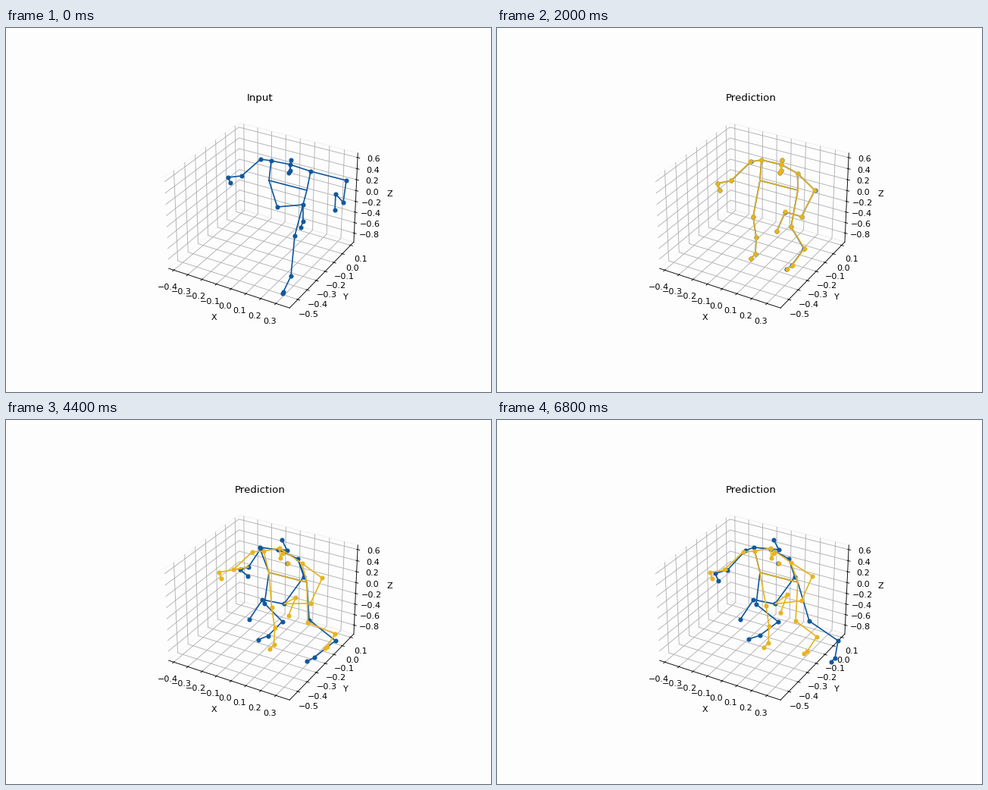
Animation, 640 px wide and 480 px high, one loop 7000 ms. Source, as a matplotlib script:

```python
import numpy as np
import matplotlib.pyplot as plt
from matplotlib.animation import FuncAnimation

W, H, DPI = 640, 480, 80
FRAMES, STEP_MS = 35, 200
SWITCH, LAST_SEEN = 7, 10
BLUE, YELLOW, PAPER = "#0f579d", "#e7b41d", "#fdfdfd"
HIP_A, HIP_B = (347, 201), (397, 214)

# Opening pose in stage pixels, every limb from root to tip
START = {
    "arm_a": [(350, 175), (336, 173), (311, 195), (293, 197), (296, 204)],
    "arm_b": [(402, 189), (449, 201), (445, 230), (435, 219), (434, 240)],
    "head": [(375, 180), (375, 188), (376, 174), (373, 191)],
    "leg_a": [(358, 236), (392, 233), (392, 255), (389, 263)],
    "leg_b": [(381, 274), (376, 327), (366, 348), (365, 350)],
}
START = {name: np.array(points, float) for name, points in START.items()}


def span(t, a, b):
    return min(max((t - a) / (b - a), 0), 1)


def step(t, a, b):
    """Ease from 0 at a to 1 at b."""
    u = span(t, a, b)
    return u * u * (3 - 2 * u)


def settle(t, a, b):
    """Start fast at a and come to rest at b."""
    return np.sin(np.pi / 2 * span(t, a, b))


def hump(t, a, b):
    """Rise and fall between a and b."""
    return np.sin(np.pi * span(t, a, b)) ** 2


def ramp(root, tip, n=5, power=0.65):
    """Offsets along a limb, going over from root to tip."""
    w = np.linspace(0, 1, n)[:, None] ** power
    return np.array(root) * (1 - w) + np.array(tip) * w


def shift(*offsets):
    return np.array(offsets, float)


def truth(t):
    """The recorded motion: a stride, then a turn of the upper body."""
    bob = shift((4, 2)) * hump(t, 0, 6)
    sway = hump(t, 12, 24)
    turn = step(t, 10, 18)
    swing = span(t, 10, 34) ** np.array([[1], [0.6], [1.7], [2]])
    moves = {
        "arm_a": bob
        + ramp((-1, -1), (-2, 10)) * step(t, 3, 10)
        + ramp((-10, -6), (-2, -2)) * turn
        + ramp((-6, 0), (36, -8)) * hump(t, 10, 28),
        "arm_b": ramp((-5, 3), (-63, 28)) * settle(t, 0, 10)
        + ramp((-12, -9), (-50, -5)) * step(t, 9, 18),
        "head": bob
        + shift((-14, -10), (-3, -17), (-11, -16), (-2, -2)) * turn
        + ramp((-8, 4), (-2, 0), 4) * sway,
        "leg_a": ramp((-7, 0), (13, -17), 4) * hump(t, 0, 6)
        + shift((-20, 13), (-50, 43), (-51, 43), (-54, 41)) * step(t, 2, 10)
        + shift((0, -11)) * step(t, 10, 17)
        + shift((4, 5), (29, 1), (6, -3), (-3, -4)) * step(t, 15, 25),
        "leg_b": shift((-9, 0)) * hump(t, 0, 6)
        + shift((7, -12), (29, -36), (23, -35), (17, -32)) * settle(t, 0, 10)
        + shift((24, 3), (45, 0), (57, 1), (59, 1)) * swing
        + ramp((0, 0), (0, -12), 4) * hump(t, 14, 22),
    }
    return {name: START[name] + moves[name] for name in START}


def guess(t):
    """The forecast: keeps the last seen pose and drifts off slowly."""
    base = truth(min(t, LAST_SEEN))
    drift = step(t, 9, 18)
    moves = {
        "arm_a": ramp((-9, -1), (-10, -5)) * drift,
        "arm_b": ramp((-9, -4), (5, -14)) * step(t, 9, 30),
        "head": shift((-14, -11), (-13, -6), (-11, 2), (-1, -2)) * drift,
        "leg_a": shift((17, -4)) * step(t, 14, 26)
        + shift((0, 7)) * hump(t, 10, 24),
        "leg_b": ramp((6, 3), (23, -10), 4, 0.4) * drift
        * (1 + 0.7 * hump(t, 10, 34)),
    }
    return {name: base[name] + moves[name] for name in base}


fig = plt.figure(figsize=(W / DPI, H / DPI), dpi=DPI, facecolor=PAPER)

# Perspective box
side = 284
ax = fig.add_axes([193.2 / W, 92.9 / H, side / W, side / H], projection="3d")
ax.view_init(elev=30, azim=-60)
ax.patch.set_visible(False)
ax.set(xlim=(-0.437, 0.389), ylim=(-0.586, 0.139), zlim=(-0.972, 0.68),
       xticks=np.arange(-4, 4) / 10, yticks=np.arange(-5, 2) / 10,
       zticks=np.arange(-4, 4) / 5, xlabel="X", ylabel="Y", zlabel="Z")
for axis in (ax.xaxis, ax.yaxis, ax.zaxis):
    axis.pane.fill = False
title = ax.set_title("Input")

# Flat layer in stage pixels for the figures
stage = fig.add_axes([0, 0, 1, 1], zorder=5)
stage.set(xlim=(0, W), ylim=(H, 0))
stage.axis("off")


class Skeleton:
    def __init__(self, color, z):
        self.lines = [stage.plot([], [], color=color, lw=1.5, zorder=z)[0]
                      for _ in range(6)]
        self.dots = stage.plot([], [], "o", color=color, ms=4.5,
                               mew=1, zorder=z + 1)[0]

    def show(self, pose, wrists=None):
        arms = [pose["arm_a"], pose["arm_b"]]
        torso = [HIP_A, arms[0][0], pose["head"][0], arms[1][0], HIP_B, HIP_A]
        if wrists is not None:
            arms = [np.insert(arm, 3, wrist, axis=0)
                    for arm, wrist in zip(arms, wrists)]
        chains = arms + [
            pose["head"][:3],
            np.vstack([HIP_A, pose["leg_a"]]),
            np.vstack([HIP_B, pose["leg_b"]]),
            np.array(torso),
        ]
        for line, chain in zip(self.lines, chains):
            line.set_data(*chain.T)
        self.dots.set_data(*np.vstack(list(pose.values())).T)

    def hide(self):
        for artist in self.lines + [self.dots]:
            artist.set_data([], [])


real = Skeleton(BLUE, 2)
model = Skeleton(YELLOW, 4)


def draw(i):
    pose = truth(i)
    real.show(pose)
    if i < SWITCH:
        title.set_text("Input")
        model.hide()
    else:
        title.set_text("Prediction")
        # the model's hands hang from the recorded wrists
        model.show(guess(i), (pose["arm_a"][2], pose["arm_b"][2]))
    return []


anim = FuncAnimation(fig, draw, frames=FRAMES, interval=STEP_MS,
                     repeat=True, repeat_delay=0)
plt.show()
```
